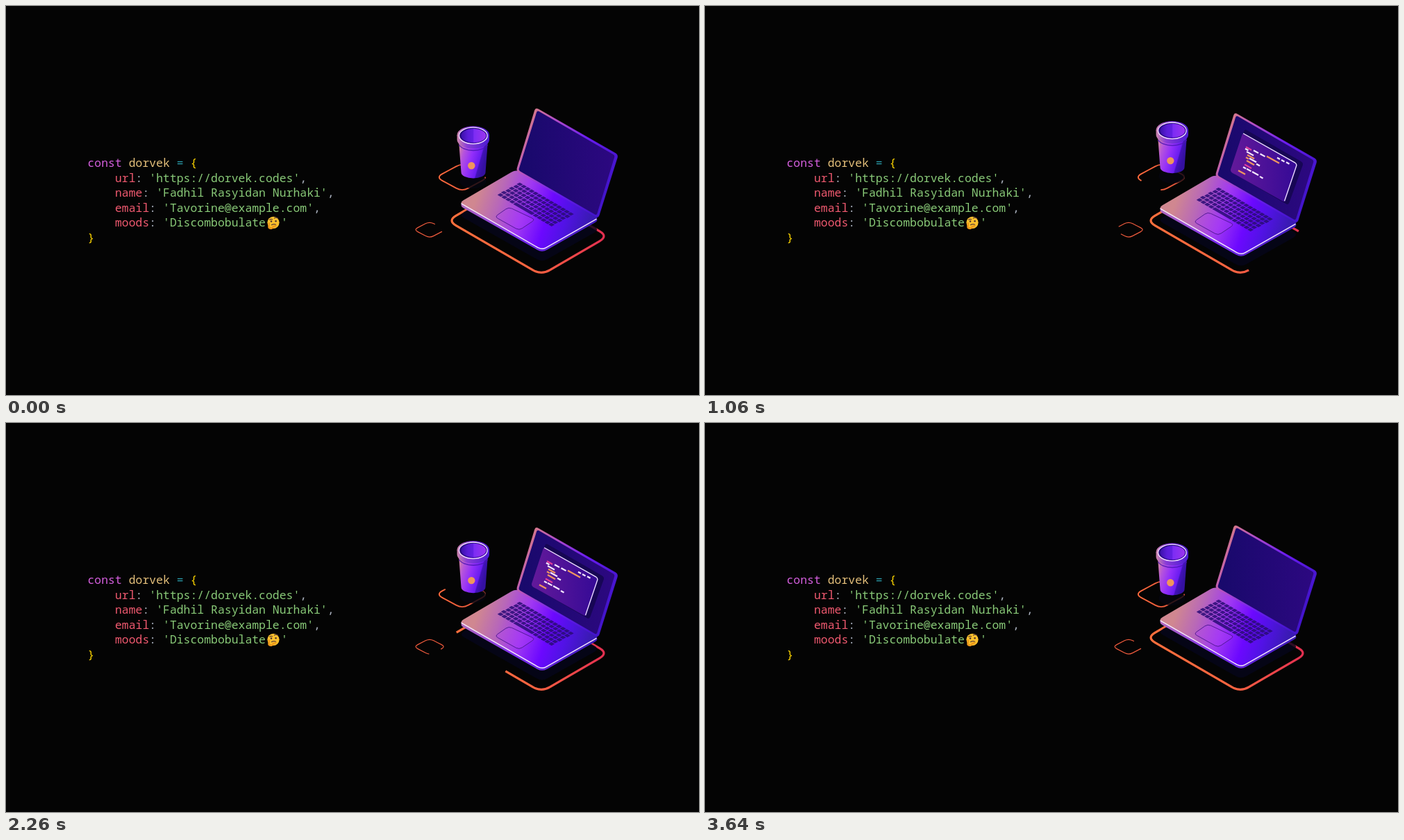
Write an HTML page that moves like this. It is 998 px wide and 561 px high and loops after 3700 ms.

```html
<!DOCTYPE html>
<html lang="en">
<head>
<meta charset="utf-8">
<title>Code card</title>
<style>
  html, body { margin: 0; width: 100%; height: 100%; overflow: hidden; background: #040404; }
  svg { display: block; width: 998px; height: 561px; }
  text { font: 16.45px "Noto Sans Mono", "DejaVu Sans Mono", monospace; white-space: pre; fill: #abb2bf; }
  .kw { fill: #d55fde; } .var { fill: #e5c07b; } .op { fill: #2b9fae; }
  .br { fill: #ffd700; } .key { fill: #ef596f; } .str { fill: #89ca78; }
</style>
</head>
<body>
<svg viewBox="0 0 998 561">
  <defs>
    <linearGradient id="track" gradientUnits="userSpaceOnUse" x1="642" y1="0" x2="861" y2="0">
      <stop offset="0" stop-color="#ff6f3c"/><stop offset=".55" stop-color="#fa6340"/><stop offset="1" stop-color="#e32f50"/>
    </linearGradient>
    <linearGradient id="coaster" gradientUnits="userSpaceOnUse" x1="624" y1="0" x2="690" y2="0">
      <stop offset="0" stop-color="#ff6a3c"/><stop offset="1" stop-color="#d9503a"/>
    </linearGradient>
    <linearGradient id="deck" gradientUnits="userSpaceOnUse" x1="686" y1="250" x2="842" y2="302">
      <stop offset="0" stop-color="#d08790"/><stop offset=".2" stop-color="#b868b8"/><stop offset=".42" stop-color="#a038f2"/>
      <stop offset=".64" stop-color="#6c08ff"/><stop offset=".8" stop-color="#5212e6"/><stop offset="1" stop-color="#3a1ab4"/>
    </linearGradient>
    <linearGradient id="side" gradientUnits="userSpaceOnUse" x1="656" y1="0" x2="852" y2="0">
      <stop offset="0" stop-color="#b26ac0"/><stop offset=".4" stop-color="#7a2cf0"/><stop offset="1" stop-color="#3a18b8"/>
    </linearGradient>
    <linearGradient id="lid" gradientUnits="userSpaceOnUse" x1="742" y1="180" x2="872" y2="250">
      <stop offset="0" stop-color="#d67a88"/><stop offset=".25" stop-color="#b04cc8"/>
      <stop offset=".6" stop-color="#6a1cf0"/><stop offset="1" stop-color="#4414cc"/>
    </linearGradient>
    <linearGradient id="glass" gradientUnits="userSpaceOnUse" x1="745" y1="0" x2="875" y2="0">
      <stop offset="0" stop-color="#19096c"/><stop offset="1" stop-color="#2c0880"/>
    </linearGradient>
    <linearGradient id="pane" gradientUnits="userSpaceOnUse" x1="760" y1="0" x2="850" y2="0">
      <stop offset="0" stop-color="#62199a"/><stop offset="1" stop-color="#360a96"/>
    </linearGradient>
    <linearGradient id="cupBody" gradientUnits="userSpaceOnUse" x1="651" y1="206" x2="692" y2="218">
      <stop offset="0" stop-color="#d98aa0"/><stop offset=".22" stop-color="#b654dc"/><stop offset=".5" stop-color="#9430fa"/>
      <stop offset=".8" stop-color="#6a1cf0"/><stop offset=".84" stop-color="#4212b8"/><stop offset="1" stop-color="#3410a0"/>
    </linearGradient>
    <linearGradient id="rim" gradientUnits="userSpaceOnUse" x1="650" y1="0" x2="696" y2="0">
      <stop offset="0" stop-color="#cc84ac"/><stop offset=".3" stop-color="#8a3cd8"/><stop offset="1" stop-color="#4a1ad0"/>
    </linearGradient>
    <linearGradient id="well" gradientUnits="userSpaceOnUse" x1="655" y1="0" x2="691" y2="0">
      <stop offset="0" stop-color="#3a0fa8"/><stop offset=".28" stop-color="#5a1cd8"/><stop offset=".5" stop-color="#6420e4"/>
      <stop offset=".52" stop-color="#7c2cf4"/><stop offset="1" stop-color="#9a34ee"/>
    </linearGradient>
  </defs>

  <g id="code"></g>
  <g id="emoji" stroke-linecap="round" fill="none">
    <circle cx="385" cy="312.3" r="8.6" fill="#fbc02d"/>
    <circle cx="382" cy="310.6" r="1.3" fill="#4e342e"/>
    <circle cx="388.6" cy="310.2" r="1.3" fill="#4e342e"/>
    <path d="M379.6 308.2q2-1.4 4-.4M386.4 306q2.4-1.8 5 .2M382.6 315.6q3-1.6 6-.4" stroke="#5d4037" stroke-width="1.2"/>
    <path d="M378.8 316.4v-3.2M378.8 316.6q-1.4 3.6 2 4.2 3 0 4-2.6l3.6-1.2" stroke="#ef9a1a" stroke-width="2.6"/>
  </g>

  <g id="tracks" fill="none"></g>

  <g id="cup">
    <ellipse cx="672.5" cy="252.5" rx="19" ry="10.5" fill="#06060f" opacity=".8"/>
    <path d="M652 194L655.5 240A17.5 8.5 0 0 0 690.5 240L694 194Z" fill="url(#cupBody)"/>
    <path d="M652.6 200A21 11 0 0 0 693.4 200" fill="none" stroke="#4a16b4" stroke-width="1.6" opacity=".8"/>
    <circle cx="670.3" cy="230.3" r="5.2" fill="#f0965c"/>
    <path d="M649.6 186v7A23.2 12.6 0 0 0 696 193v-7Z" fill="url(#rim)"/>
    <ellipse cx="672.8" cy="186" rx="23.2" ry="12.8" fill="url(#rim)"/>
    <ellipse cx="672.8" cy="186.6" rx="19.6" ry="11.2" fill="#240a80"/>
    <ellipse cx="673.4" cy="187" rx="18" ry="10" fill="url(#well)"/>
    <ellipse cx="672.8" cy="187" rx="20.4" ry="11.8" fill="none" stroke="#f0dcff" stroke-width="1.3"/>
  </g>

  <g id="laptop">
    <g id="body"></g>
    <g id="keys" fill="#2a0c76" opacity=".86" transform="matrix(5.64 3.29 -5.67 3 740 254)"></g>
    <g id="screen">
      <g id="panel"></g>
      <g id="dashes" fill="none" stroke-width="2.2" transform="translate(0 -7.5)"></g>
    </g>
  </g>
</svg>
<script>
const NS = 'http://www.w3.org/2000/svg';
const $ = id => document.getElementById(id);

function add(parent, tag, attrs, text) {
  const el = document.createElementNS(NS, tag);
  for (const k in attrs) el.setAttribute(k, attrs[k]);
  if (text) el.textContent = text;
  return parent.appendChild(el);
}

// Closed polygon with soft corners, starting halfway along the first side.
function soft(pts, r) {
  const n = pts.length;
  const toward = (a, b) => {
    const k = r / Math.hypot(b[0] - a[0], b[1] - a[1]);
    return [a[0] + (b[0] - a[0]) * k, a[1] + (b[1] - a[1]) * k];
  };
  let d = `M${(pts[0][0] + pts[1][0]) / 2} ${(pts[0][1] + pts[1][1]) / 2}`;
  for (let i = 1; i <= n; i++) {
    const p = pts[i % n];
    d += `L${toward(p, pts[i - 1])}Q${p} ${toward(p, pts[(i + 1) % n])}`;
  }
  return d + 'Z';
}

const shape = (parent, pts, r, attrs) => add(parent, 'path', { d: soft(pts, r), ...attrs });

// Code listing
const lines = [
  [0, 'kw', 'const ', 'var', 'dorvek', 'op', ' = ', 'br', '{'],
  [4, 'key', 'url', '', ': ', 'str', "'https://dorvek.codes'", '', ','],
  [4, 'key', 'name', '', ': ', 'str', "'Fadhil Rasyidan Nurhaki'", '', ','],
  [4, 'key', 'email', '', ': ', 'str', "'Tavorine@example.com'", '', ','],
  [4, 'key', 'moods', '', ': ', 'str', "'Discombobulate"],
  [0, 'br', '}']
];
lines.forEach(([indent, ...parts], i) => {
  const row = add($('code'), 'text', { x: 117.5 + indent * 9.87, y: 232 + i * 21.5 });
  for (let j = 0; j < parts.length; j += 2) add(row, 'tspan', { class: parts[j] }, parts[j + 1]);
});
add($('code'), 'text', { class: 'str', x: 396, y: 318 }, "'");

// Outlines with a travelling gap: points, corner, style, gap start, laps
const tracks = [
  { pts: [[732, 253.5], [867, 332], [771, 388], [636, 309.5]], r: 14, stroke: 'url(#track)', width: 3.2, from: .054, laps: 1 },
  { pts: [[657, 226.5], [619.5, 247], [657, 267.5], [694.5, 247]], r: 10, stroke: 'url(#coaster)', width: 1.9, from: -.18, laps: 2 },
  { pts: [[610, 310.8], [633, 322.6], [610, 334.6], [587.2, 322.6]], r: 6.5, stroke: '#ee5a3c', width: 1.2, from: .155, laps: 2 }
];
for (const t of tracks) {
  t.el = shape($('tracks'), t.pts, t.r, {
    stroke: t.stroke, 'stroke-width': t.width, pathLength: 100, 'stroke-dasharray': '80 20'
  });
}

// Laptop
const body = $('body');
const deck = [[735, 235.5], [855, 305], [772, 352], [652, 284]];
const shifted = dy => deck.map(([x, y]) => [x, y + dy]);
shape(body, shifted(17.5), 9, { fill: '#05051a', opacity: .82 });
shape(body, shifted(3.6), 8, { fill: 'url(#side)' });
shape(body, deck, 8, { fill: 'url(#deck)' });
add(body, 'path', {
  d: 'M656 285.2L766 348.4Q772 351.6 777.5 348.6L850 307.4', fill: 'none',
  stroke: '#f3e4ff', 'stroke-width': 1.5, 'stroke-linecap': 'round'
});
shape(body, [[724, 290], [762, 308], [739, 323.5], [704, 304]], 5, { fill: '#b040f4', 'fill-opacity': .35, stroke: '#4a168e', 'stroke-width': .9 });
shape(body, [[762.5, 146], [882, 214.5], [853, 306.5], [734.5, 238]], 5, { fill: 'url(#lid)' });
shape(body, [[765, 150.5], [877, 215.5], [850.5, 302], [738, 237]], 3, { fill: 'url(#glass)' });

for (let row = 0; row < 6; row++) {
  for (let col = 0; col < 14; col++) {
    const space = row === 5 && col > 3 && col < 9;
    if (space && col > 4) continue;
    add($('keys'), 'rect', {
      x: col + .07 + (row % 2) * .12, y: row + .1, width: space ? 4.8 : .84, height: .8, rx: .12
    });
  }
}

// Editor window on the display
const panel = $('panel');
shape(panel, [[777, 170], [862, 219], [840, 280], [759, 233]], 4, { fill: '#14064e', opacity: .85 });
shape(panel, [[774.5, 175.5], [853.5, 220.5], [835, 276], [756, 231.5]], 4, { fill: 'url(#pane)' });
add(panel, 'path', {
  d: 'M775 176.5L849.5 218.6Q852.6 220.6 851.6 223.6L834.5 274', fill: 'none', stroke: '#efe2ff', 'stroke-width': 1.3
});
const inks = { w: '#f4e6ff', o: '#ee9560', p: '#e2409a' };
const dashes = {
  w: [[790, 208.5, 7], [799.5, 213.5, 7], [824, 219, 4], [830, 222.3, 4.5], [837, 225.5, 4.5], [778, 206, 4.5],
      [780, 210.3, 10], [784, 220, 10], [794, 228, 5], [775, 232.5, 4], [780, 235, 6.5], [788, 239.3, 9], [799, 246.2, 4.5]],
  o: [[809, 217, 18], [781, 215, 10], [779, 218.5, 4], [780, 223.3, 11], [768, 237.5, 10]],
  p: [[779, 203.5, 8], [777, 228.8, 10]]
};
for (const ink in dashes) {
  for (const [x, y, len] of dashes[ink]) {
    add($('dashes'), 'path', { d: `M${x} ${y}l${len} ${len * .56}`, stroke: inks[ink] });
  }
}

// Motion
const LOOP = 3700, SPAN = 3540, STEP = 30, HOLD = 100;
const clamp = v => Math.max(0, Math.min(1, v));

function bob(u) {
  const tri = 1 - Math.abs(1 - (u * 4) % 2);
  return 7.6 * (tri + (1 - Math.cos(Math.PI * tri)) / 2) / 2;
}

function draw(ms) {
  const t = ms % LOOP;
  const u = clamp(Math.floor((t - HOLD) / STEP) * STEP / SPAN);
  const y = bob(u);
  $('laptop').setAttribute('transform', `translate(0 ${y})`);
  $('cup').setAttribute('transform', `translate(0 ${-y})`);
  $('screen').setAttribute('opacity', clamp((u - .19) / .05) * clamp((.75 - u) / .05));
  for (const k of tracks) k.el.setAttribute('stroke-dashoffset', -100 * (k.from + u * k.laps));
}

const start = performance.now();
function tick() {
  draw(performance.now() - start);
  requestAnimationFrame(tick);
}
tick();
</script>
</body>
</html>
```
